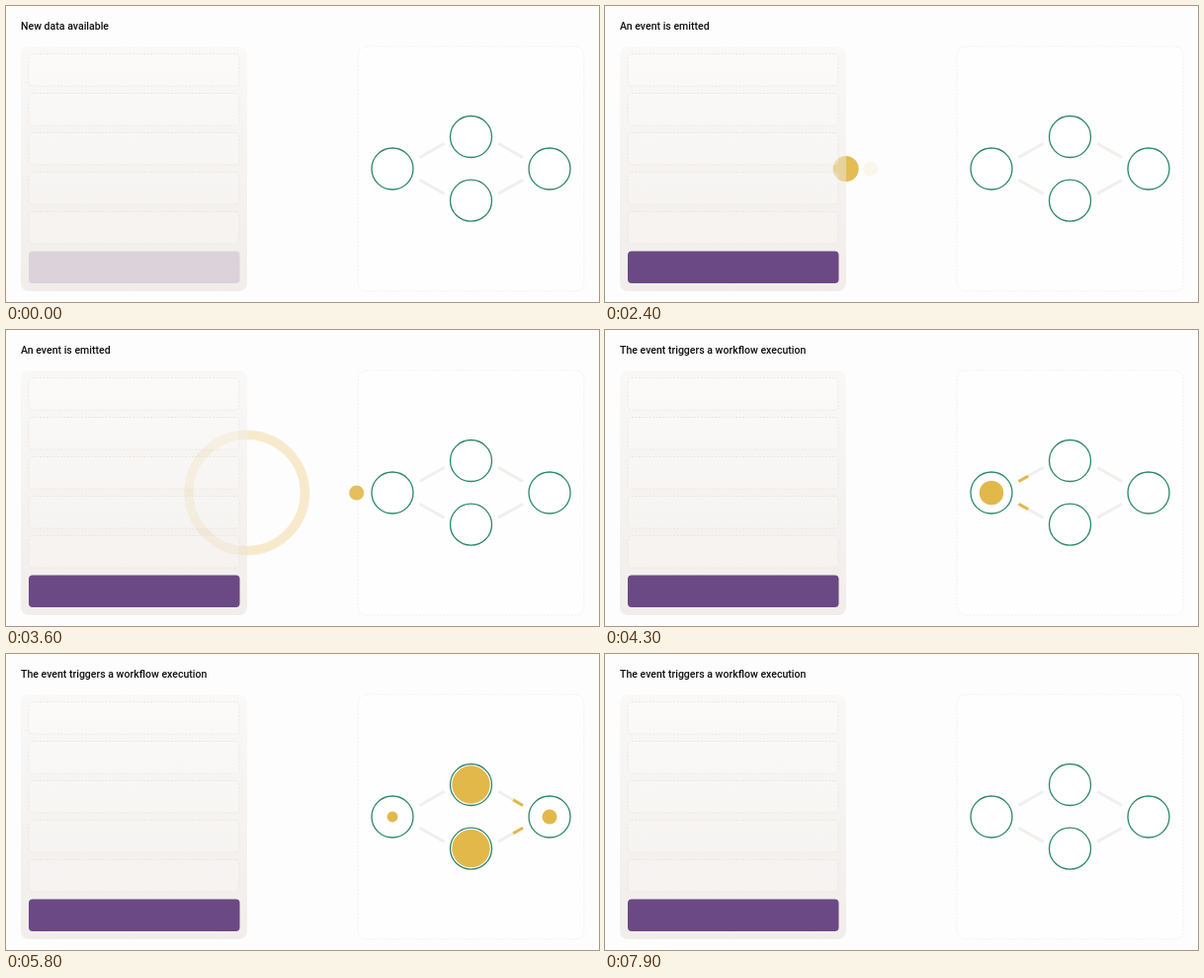
These frames come from a looping animation (600 px wide and 300 px high, 8000 ms). An HTML page:

```html
<!DOCTYPE html>
<html lang="en">
<head>
<meta charset="utf-8">
<title>Event workflow</title>
<style>
  html, body { margin: 0; width: 100%; height: 100%; overflow: hidden; background: #fefdfe; }
  svg { display: block; width: 600px; height: 300px; }
  text { font: 500 10.55px Roboto, Arial, sans-serif; fill: #111; }
  .slot { fill: #fff; fill-opacity: .2; stroke: #e6e4df; stroke-width: .8; stroke-dasharray: 2 1.5; }
  .flow { fill: #fefefe; stroke: #e6eeeb; stroke-width: .8; stroke-dasharray: 2 1.5; }
  .node { fill: #fff; stroke: #2c866a; stroke-width: 1.3; }
  .link { stroke: #f1eeec; stroke-width: 3; }
  .pulse { stroke: #e2b84a; stroke-width: 3; stroke-dasharray: 12 60; }
  .gold { fill: #e2b84a; }
</style>
</head>
<body>
<svg viewBox="0 0 600 300">
  <defs>
    <linearGradient id="shade" x1="0" y1="0" x2="0" y2="1">
      <stop offset="0" stop-color="#f6f4f0"/>
      <stop offset="1" stop-color="#e4ddd6"/>
    </linearGradient>
  </defs>
  <text id="caption" x="15" y="24"></text>
  <circle id="ring" cx="243.7" cy="165" fill="none" stroke="#e2b84a"/>
  <rect x="15" y="41" width="229" height="248" rx="8" fill="url(#shade)" fill-opacity=".5"/>
  <g id="slots"></g>
  <rect id="record" x="23" y="248.5" width="213.5" height="32.5" rx="4" fill="#6b4984"/>
  <rect class="flow" x="356.3" y="41" width="228.5" height="248" rx="8"/>
  <g id="graph"></g>
  <circle id="dot" class="gold" cy="165" r="7.6"/>
</svg>
<script>
const LOOP = 8000, STEP = 100;
const STAGGER = 850;           // delay from one column of the graph to the next
const FILL_START = 3820, FILL_TIME = 2180, FILL_RADIUS = 19.2;
const PULSE_START = 3900, PULSE_SPEED = 0.028, PULSE_END = 42;

const captions = [
  [0, 'New data available'],
  [2400, 'An event is emitted'],
  [4100, 'The event triggers a workflow execution']
];
// x, y, column
const nodes = [[391, 165, 0], [470.5, 132.5, 1], [470.5, 197.2, 1], [550, 165, 2]];
// x1, y1, x2, y2, column
const links = [
  [418.5, 153.5, 443.5, 139.3, 0], [418.5, 176.2, 443.5, 190.4, 0],
  [498, 139.3, 523, 153.5, 1], [498, 190.4, 523, 176.2, 1]
];

const $ = id => document.getElementById(id);
const clamp = (v, lo = 0, hi = 1) => Math.min(hi, Math.max(lo, v));
const easeOut = (u, power) => 1 - (1 - u) ** power;
const easeInOut = (u, power) =>
  u < .5 ? (2 * u) ** power / 2 : 1 - (2 - 2 * u) ** power / 2;

function add(parent, tag, attrs) {
  const el = document.createElementNS('http://www.w3.org/2000/svg', tag);
  set(el, attrs);
  parent.appendChild(el);
  return el;
}
function set(el, attrs) {
  for (const key in attrs) el.setAttribute(key, attrs[key]);
}

for (let i = 0; i < 5; i++) {
  add($('slots'), 'rect', { class: 'slot', x: 23, y: 48.5 + 40 * i, width: 213, height: 32.5, rx: 4 });
}
const pulses = links.map(([x1, y1, x2, y2, column]) => {
  const line = { x1, y1, x2, y2 };
  add($('graph'), 'line', { ...line, class: 'link' });
  return { column, el: add($('graph'), 'line', { ...line, class: 'pulse' }) };
});
const fills = nodes.map(([cx, cy, column]) => {
  add($('graph'), 'circle', { cx, cy, r: 21, class: 'node' });
  return { column, el: add($('graph'), 'circle', { cx, cy, r: 0, class: 'gold' }) };
});

function render(t) {
  $('caption').textContent = captions.filter(([start]) => t >= start).pop()[1];
  set($('record'), { opacity: clamp((t + 100) / 600) });

  const wave = clamp((t - 2300) / 1800);
  const outer = 63.8 * easeOut(wave, 4), inner = 62.5 * easeInOut(wave, 2.2);
  set($('ring'), {
    r: (outer + inner) / 2,
    'stroke-width': Math.max(0, outer - inner),
    opacity: t < 2400 ? 0 : 1 - wave
  });

  const travel = easeOut(clamp((t - 2300) / 1900), 2);
  set($('dot'), { cx: 257.5 + 108 * travel, opacity: t < 4200 ? travel : 0 });

  for (const { column, el } of pulses) {
    const head = clamp((t - PULSE_START - column * STAGGER) * PULSE_SPEED, 0, PULSE_END);
    set(el, { 'stroke-dashoffset': 12 - head, opacity: head > 0 && head < PULSE_END ? 1 : 0 });
  }
  for (const { column, el } of fills) {
    const u = clamp((t - FILL_START - column * STAGGER) / FILL_TIME);
    set(el, { r: Math.max(0, FILL_RADIUS * Math.sin(Math.PI * u)) });
  }
}

const begin = performance.now();
function tick() {
  const t = (performance.now() - begin) % LOOP;
  render(Math.floor(t / STEP) * STEP);
  requestAnimationFrame(tick);
}
tick();
</script>
</body>
</html>
```
